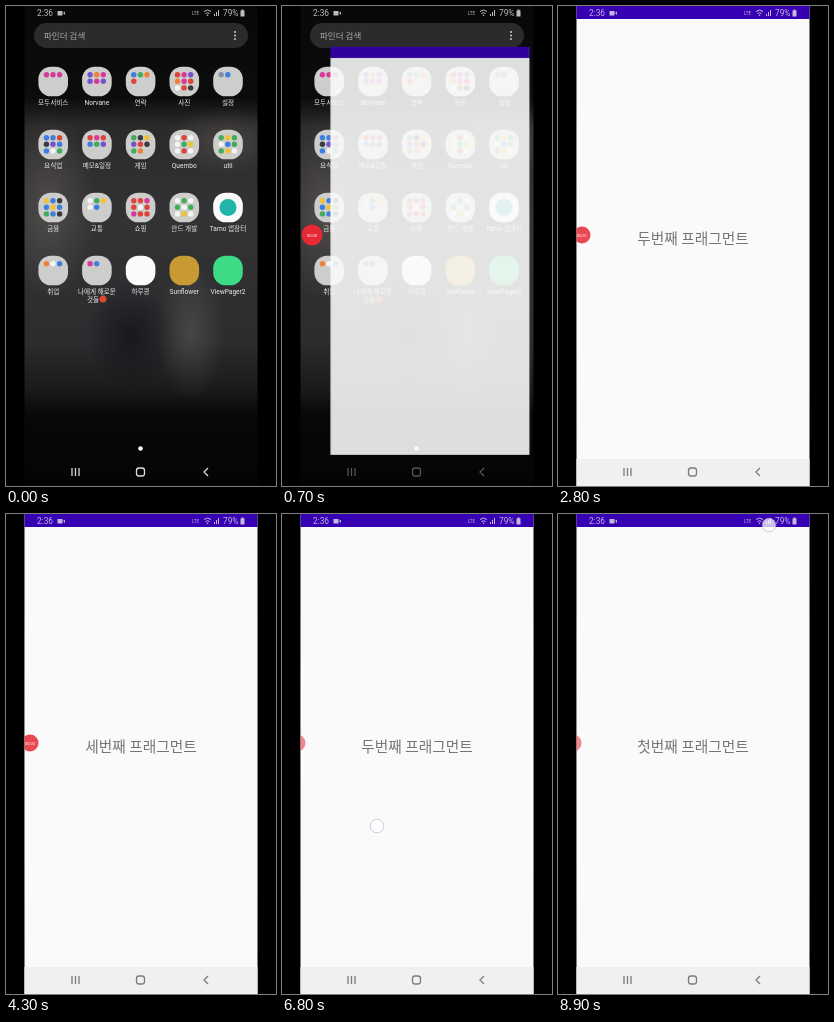
An HTML page that plays this animation: 270 by 480 pixels, repeating every 9 s.

```html
<!DOCTYPE html>
<html lang="ko">
<head>
<meta charset="utf-8">
<style>
html, body { margin: 0; width: 100%; height: 100%; overflow: hidden; background: #000; }
svg { display: block; width: 100vw; height: 100vh; }
text { font-family: Roboto, "Noto Sans CJK KR", "Noto Sans CJK JP", sans-serif; }
.mid { text-anchor: middle; }
</style>
</head>
<body>
<svg viewBox="0 0 270 480">
  <defs>
    <clipPath id="phone"><rect x="18.5" width="233" height="480"/></clipPath>
    <linearGradient id="wall" x2="0" y2="1">
      <stop offset="0" stop-color="#080808"/>
      <stop offset=".19" stop-color="#0c0c0c"/>
      <stop offset=".25" stop-color="#2b2a2a"/>
      <stop offset=".45" stop-color="#333235"/>
      <stop offset=".7" stop-color="#2c2c2f"/>
      <stop offset=".8" stop-color="#1a1a1b"/>
      <stop offset=".85" stop-color="#080808"/>
      <stop offset="1" stop-color="#040404"/>
    </linearGradient>
    <radialGradient id="haze">
      <stop stop-color="#7a736c" stop-opacity=".5"/>
      <stop offset="1" stop-color="#7a736c" stop-opacity="0"/>
    </radialGradient>
    <radialGradient id="shade">
      <stop stop-color="#121217" stop-opacity=".75"/>
      <stop offset="1" stop-color="#121217" stop-opacity="0"/>
    </radialGradient>
  </defs>
  <rect width="270" height="480"/>
  <g clip-path="url(#phone)">
    <g id="home">
      <rect x="18" width="234" height="480" fill="url(#wall)"/>
      <ellipse cx="42" cy="200" rx="48" ry="95" fill="url(#haze)" opacity=".8"/>
      <ellipse cx="220" cy="135" rx="60" ry="35" fill="url(#haze)" opacity=".7"/>
      <ellipse cx="185" cy="325" rx="34" ry="70" fill="url(#haze)" opacity=".7"/>
      <ellipse cx="125" cy="330" rx="45" ry="55" fill="url(#shade)"/>
      <rect x="28" y="17" width="214" height="25" rx="12.5" fill="#2b2b2c"/>
      <text x="38" y="32.5" font-size="8.5" fill="#a8a8a8">파인더 검색</text>
      <path d="M229 26v0M229 29.5v0M229 33v0" stroke="#ccc" stroke-width="2" stroke-linecap="round"/>
      <g id="icons"></g>
      <circle cx="134.5" cy="442.5" r="2.3" fill="#fff"/>
    </g>
    <g id="app">
      <rect x="18" width="234" height="480" fill="#fafafa"/>
      <rect x="18" width="234" height="13" fill="#3700b3"/>
      <path id="glow" fill="#6200ee"/>
      <g id="pages" class="mid" font-size="14.7" fill="#757575"></g>
      <rect id="navBg" x="18" y="453" width="234" height="27" fill="#f0f0f0"/>
    </g>
    <g fill="#dcdce4" font-size="8.3" opacity=".85">
      <text x="31" y="10">2:36</text>
      <path d="M51.5 5h5v4.500h-5zM57 7l2-1.500v3.500z"/>
      <text x="186" y="9" font-size="4.5">LTE</text>
      <path d="M198 5.500q3.500-3 7 0M199.500 7.500q2-1.500 4 0" fill="none" stroke="#dcdce4"/>
      <circle cx="201.5" cy="9.3" r=".8"/>
      <path d="M208 10v-2h1v2zM210 10v-4h1v4zM212 10v-6h1v6z"/>
      <text x="217" y="10">79%</text>
      <path d="M234.500 4.500h1v-1h2v1h1v6h-4z"/>
    </g>
    <g id="nav" fill="none" stroke-width="1.3">
      <path d="M66 462v8M69.500 462v8M73 462v8M202 462l-4 4l4 4"/>
      <rect x="130.5" y="462" width="8" height="8" rx="2.5"/>
    </g>
    <g id="rec">
      <circle id="recDot" cy="229" fill="#e62a35"/>
      <text id="recTime" class="mid" y="230.5" font-size="4" fill="#fff"></text>
    </g>
    <circle id="touch" r="6.8" fill="#fff" fill-opacity=".75" stroke="#aeabc8" stroke-opacity=".6"/>
  </g>
</svg>
<script>
const $ = id => document.getElementById(id);
const set = (id, attrs) => { for (const k in attrs) $(id).setAttribute(k, attrs[k]); };
const clamp = v => Math.max(0, Math.min(1, v));
const ramp = (t, a, b) => clamp((t - a) / (b - a));
const mix = (a, b, u) => a + (b - a) * u;
const easeOut = (u, n) => 1 - (1 - u) ** n;

// Launcher: label and the colours of the small icons in each folder
const hues = { p: '#d83a9c', v: '#7752cf', b: '#3c7fe0', r: '#de433c', g: '#40ad5b',
               y: '#efc236', w: '#f4f4f4', k: '#3a3a42', o: '#ef8036', s: '#8090a8' };
const folders = [
  ['모두서비스', 'ppp'], ['Norvane', 'vopvpv'], ['연락', 'bgor'], ['사진', 'rpvoprwrk'], ['설정', 'sb'],
  ['요식업', 'bbrkvbbwg'], ['메모&일정', 'rprbgv'], ['게임', 'gkyvrkgo'], ['Quembo', 'wrwwgywrw'], ['util', 'gygwbggyw'],
  ['금융', 'ybkbybgbk'], ['교통', 'wgywb'], ['쇼핑', 'rrprwrprr'], ['안드 개발', 'wgwgwgwyw'], ['Tamo 앱장터', '', '#fafafa', '#20b5a8'],
  ['취업', 'owb'], ['나에게 해로운', 'pb'], ['하루콩', '', '#fafafa'], ['Sunflower', '', '#c89a34'], ['ViewPager2', '', '#3ddc84']
];
$('icons').innerHTML = folders.map(([label, dots, plate = '#cdcdcb', mark], i) => {
  const x = 47.2 + i % 5 * 43.7, y = 75.5 + Math.floor(i / 5) * 63;
  const minis = [...dots].map((c, k) =>
    `<circle cx="${x - 6.8 + k % 3 * 6.6}" cy="${y - 6.8 + Math.floor(k / 3) * 6.6}" r="2.7" fill="${hues[c]}"/>`);
  return `<rect x="${x - 14.8}" y="${y - 14.8}" width="29.6" height="29.6" rx="12.5" fill="${plate}"/>` + minis.join('') +
    (mark ? `<circle cx="${x}" cy="${y}" r="8.5" fill="${mark}"/>` : '') +
    `<text class="mid" x="${x}" y="${y + 23.2}" font-size="6.6" fill="#eee">${label.replace('&', '&amp;')}</text>`;
}).join('') + '<text x="81" y="295.5" font-size="6.6" fill="#eee">것들</text><circle cx="97" cy="293" r="3.5" fill="#d9482f"/>';

$('pages').innerHTML = ['첫', '두', '세'].map((n, i) =>
  `<text x="${135 + i * 234}" y="238.2">${n}번째 프래그먼트</text>`).join('');

// Gestures: shown, moving, released, over, from x, to x, y, page before, page after
const gestures = [
  [300, 300, 400, 600, 222, 222, 264, 0, 0],
  [2000, 2100, 2400, 2850, 192, 75, 281, 0, 1],
  [3500, 3500, 3700, 4000, 200, 80, 281, 1, 2],
  [4800, 4850, 5150, 5450, 200, 90, 300, 2, 2],
  [5600, 5750, 6000, 6400, 88, 200, 310, 2, 1],
  [6800, 6850, 7050, 7400, 95, 200, 312, 1, 0],
  [7800, 7850, 8100, 8500, 125, 226, 307, 0, 0]
];

function swipe(t) {
  const g = gestures.findLast(g => t >= g[0]);
  if (!g) return { page: 0, pull: 0, x: 0, y: 0, alpha: 0 };
  const [, move, up, end, x0, x1, y, from, to] = g;
  const x = mix(x0, x1, ramp(t, move, up));
  const alpha = 1 - ramp(t, up, end);
  const dragged = (x0 - x) / 234;
  const page = from === to ? from : mix(from + dragged, to, easeOut(ramp(t, up, end - 100), 3));
  return { page, pull: from === to ? dragged * alpha : 0, x, y, alpha };
}

function draw(t) {
  // The app window grows out of its launcher icon
  const open = easeOut(ramp(t, 455, 855), 2);
  const started = t >= 900;
  set('app', {
    opacity: open > .95 ? 1 : open * 1.05,
    transform: `translate(${mix(221, 135, open)} ${mix(272.5, 240, open)}) scale(${open}) translate(-135 -240)`
  });
  set('navBg', { opacity: +started });
  set('nav', { stroke: started ? '#7c7c7c' : t < 450 ? '#ddd' : '#555' });

  const s = swipe(t);
  set('pages', { transform: `translate(${-s.page * 234} 0)`, opacity: ramp(t, 1050, 1500) });
  const edge = s.pull > 0 ? 252 : 18;
  set('glow', { d: `M${edge} 13Q${edge - s.pull * 110} 233 ${edge} 453z`, opacity: Math.abs(s.pull) * .45 });

  // Last, a finger reaches for the status bar
  if (t >= 8700) Object.assign(s, t < 8900 ? { x: 213, y: 6 } : { x: 211, y: 11 }, { alpha: 1 });
  set('touch', { cx: s.x, cy: s.y, opacity: s.alpha });

  // The recorder button shrinks, then tucks itself behind the edge
  const shrink = ramp(t, 2000, 2500), hide = ramp(t, 4800, 5300);
  const x = 30 - 6 * shrink - 9 * hide;
  set('rec', { opacity: t < 200 ? 0 : 1 - .15 * shrink - .3 * hide });
  set('recDot', { cx: x, r: 10.5 - 2 * shrink });
  set('recTime', { x, opacity: 1 - hide });
  $('recTime').textContent = '00:0' + Math.max(0, Math.floor((t - 1300) / 1000));
}

function frame() {
  draw(Math.floor(performance.now() / 100) * 100 % 9000);
  requestAnimationFrame(frame);
}
frame();
</script>
</body>
</html>
```
